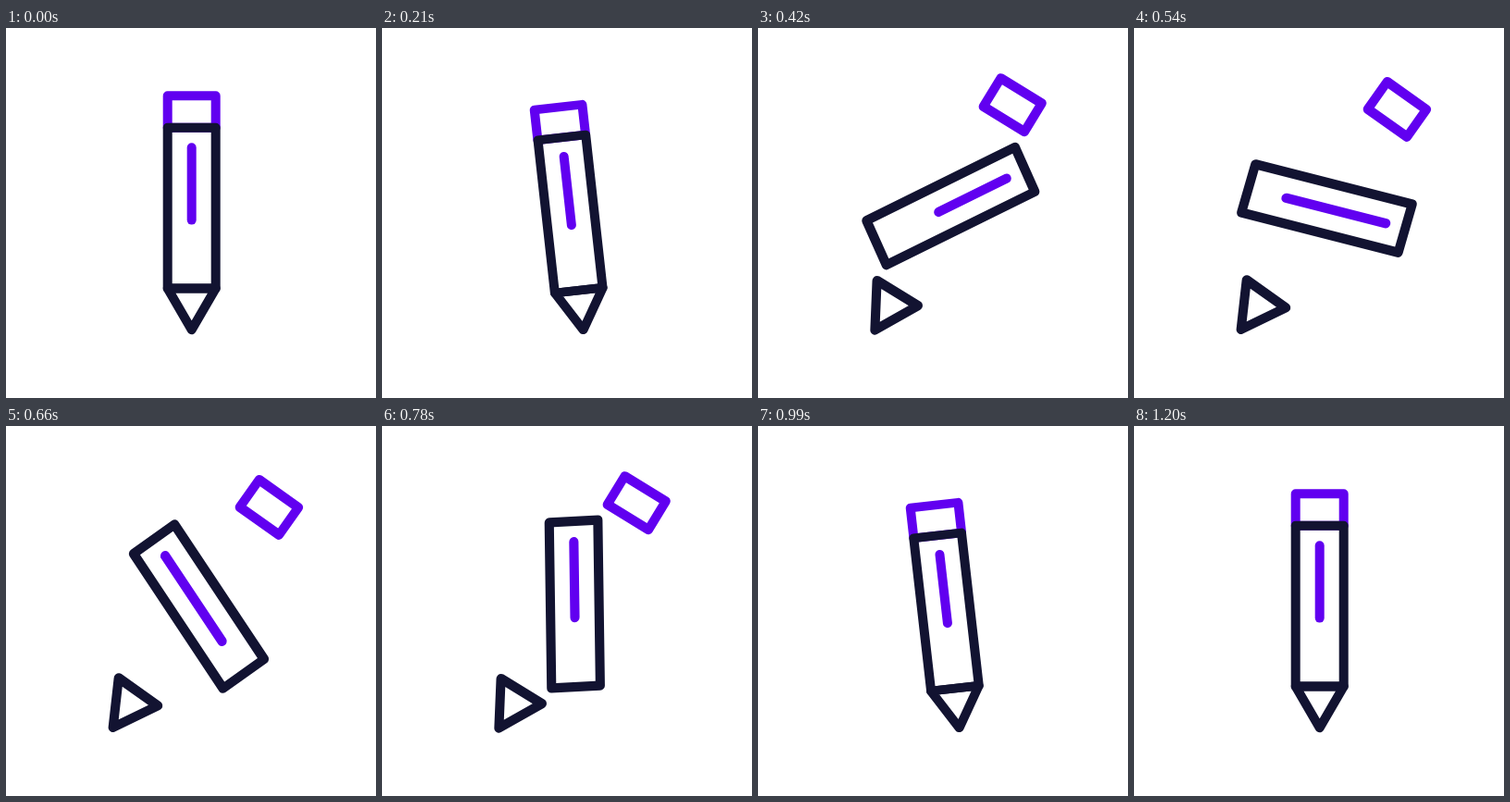
These frames come from a looping animation (400x400 px, 1.26 s). An HTML page with a canvas:

```html
<!DOCTYPE html>
<html lang="en">
<head>
<meta charset="utf-8">
<title>Pencil</title>
<style>
  html, body { margin: 0; width: 100%; height: 100%; overflow: hidden; background: #fff; }
  canvas { display: block; width: 400px; height: 400px; }
</style>
</head>
<body>
<canvas id="stage"></canvas>
<script>
const DARK = '#121331', VIOLET = '#6100f0';
const LOOP = 1260, ACTIVE = 1200, STEP = 30, HALF = ACTIVE / 2;

const canvas = document.getElementById('stage');
const ctx = canvas.getContext('2d');
const ratio = window.devicePixelRatio || 1;
canvas.width = canvas.height = 400 * ratio;

const mix = (a, b, k) => a + (b - a) * k;
const progress = (t, from, to) => Math.min(1, Math.max(0, (t - from) / (to - from)));

function bezier(x1, y1, x2, y2) {
  const at = (a, b, u) => 3 * a * u * (1 - u) ** 2 + 3 * b * u * u * (1 - u) + u ** 3;
  return x => {
    if (x <= 0 || x >= 1) return x;
    let low = 0, high = 1;
    for (let i = 0; i < 30; i++) {
      const mid = (low + high) / 2;
      if (at(x1, x2, mid) < x) low = mid; else high = mid;
    }
    return at(y1, y2, low);
  };
}

const smooth = bezier(1 / 3, 0, 2 / 3, 1);
const burst = bezier(1 / 3, 0, 0, 1);
const grow = bezier(1 / 3, 0, 5 / 6, 5 / 6);

function stroke(color, points, closed = true) {
  ctx.beginPath();
  points.forEach(([x, y]) => ctx.lineTo(x, y));
  if (closed) ctx.closePath();
  ctx.strokeStyle = color;
  ctx.stroke();
}

const box = (top, bottom) => [[-26, top], [26, top], [26, bottom], [-26, bottom]];

// Rest, wind-up and burst poses of the whole pencil, pivoting on its point.
const REST = { x: 200.7, y: 326.3, turn: 0, stretch: 1, gap: 0 };
const WIND = { x: 217.8, y: 326.3, turn: -6.5, stretch: 0.957, gap: 0 };
const OPEN = { x: 127.6, y: 307.8, turn: 35.7, stretch: 1.052, gap: 21 };

function poseAt(t) {
  const mirrored = Math.min(t, ACTIVE - t);
  const [a, b, k] = mirrored < 200
    ? [REST, WIND, smooth(progress(mirrored, 0, 200))]
    : [WIND, OPEN, burst(progress(mirrored, 200, HALF))];
  const pose = {};
  for (const key in a) pose[key] = mix(a[key], b[key], k);
  return pose;
}

function draw(t) {
  const pose = poseAt(t);
  const spin = Math.PI * smooth(progress(t, 200, 1000));
  const lineEnd = mix(13, 65.4, grow(progress(t, 400, HALF)));
  const lineStart = -mix(13, 65.4, grow(progress(ACTIVE - t, 400, HALF)));

  ctx.setTransform(ratio, 0, 0, ratio, 0, 0);
  ctx.fillStyle = '#fff';
  ctx.fillRect(0, 0, 400, 400);
  ctx.lineWidth = 10;
  ctx.lineCap = ctx.lineJoin = 'round';

  ctx.translate(pose.x, pose.y);
  ctx.rotate(pose.turn * Math.PI / 180);
  ctx.scale(1, pose.stretch);

  stroke(VIOLET, box(-253 - pose.gap, -218.6 - pose.gap));
  stroke(DARK, [[-26, -44.8 + pose.gap], [26, -44.8 + pose.gap], [0, pose.gap]]);

  ctx.translate(0, -131.7);
  ctx.rotate(spin);
  stroke(VIOLET, [[0, lineStart], [0, lineEnd]], false);
  stroke(DARK, box(-86.9, 86.9));
}

const start = performance.now();
function tick() {
  const elapsed = (performance.now() - start) % LOOP;
  draw(Math.min(ACTIVE, Math.floor(elapsed / STEP) * STEP));
  requestAnimationFrame(tick);
}
tick();
</script>
</body>
</html>
```
